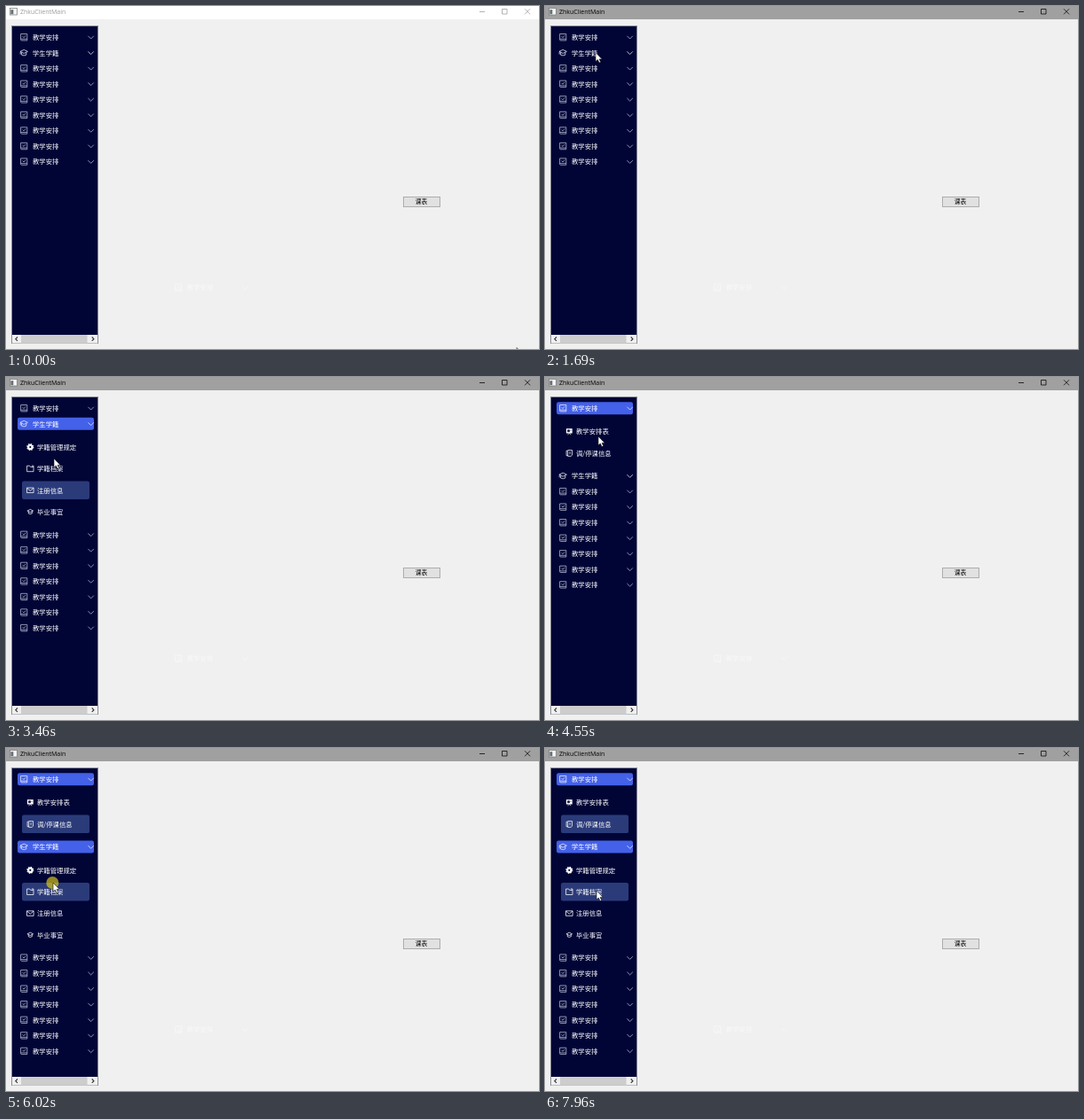
Animation of 600x387 px, one loop 8 s. Source, as an HTML page:

```html
<!DOCTYPE html>
<html lang="zh-CN">
<head>
<meta charset="utf-8">
<title>Sidebar menu</title>
<style>
  html, body { margin: 0; width: 100%; height: 100%; overflow: hidden; background: #f0f0f0; }
  svg { display: block; width: 600px; height: 387px; }
  text { font: 7.35px "Noto Sans CJK SC", "Noto Sans CJK", sans-serif; }
  .title { font: 7px "Open Sans", "Noto Sans", sans-serif; }
  .line { fill: none; stroke: currentColor; stroke-width: .75; }
</style>
</head>
<body>
<svg viewBox="0 0 600 387">
  <rect width="600" height="387" fill="#f0f0f0"/>
  <g id="bar">
    <rect id="barFill" width="600" height="15"/>
    <rect x="4.5" y="2.5" width="8" height="7.5" fill="#f4f4f4" stroke="#777" stroke-width=".7"/>
    <rect x="5.3" y="4.2" width="3" height="5" fill="#66707a"/>
    <text class="title" x="16" y="9.3" fill="currentColor">ZhkuClientMain</text>
    <path class="line" d="M533 6.5h6M558.5 3.5h5.5v5.5h-5.5zM584 3.3l6 6m0-6l-6 6"/>
  </g>
  <rect x="6.5" y="22.5" width="97" height="358" fill="#000536" stroke="#8a8e9a"/>
  <g id="menu"></g>
  <rect x="7" y="371" width="96" height="9.5" fill="#f0f0f0"/>
  <rect x="17" y="371" width="74.5" height="9.5" fill="#cdcdcd"/>
  <path d="M13 373.5l-2.2 2.2 2.2 2.2M96.7 373.5l2.2 2.2-2.2 2.2" fill="none" stroke="#333" stroke-width="1.1"/>
  <rect x="447.5" y="215.5" width="41" height="11" fill="#e1e1e1" stroke="#adadad"/>
  <text x="467.5" y="223.4" text-anchor="middle" style="font-size:6.8px">课表</text>
  <g id="ghost" color="#f8f8f8"></g>
  <circle id="press" r="7" fill="#f0dc14" fill-opacity=".62"/>
  <path id="cursor" d="M0 0V10L2.3 8 4 11.6 5.7 10.8 4.1 7.4H7.2Z" fill="#fff" stroke="#111" stroke-width=".6"/>
</svg>
<script>
const LOOP = 8000, ROW = 17.55, SUB = 24.35, PAD = 10.1;
const $ = id => document.getElementById(id);

// icons are centred on 0,0
const line = d => `<path class="line" d="${d}"/>`;
const icons = {
  book: line('M-3.5 -3.7H3.6V3.7H-2.6Q-3.6 3.7 -3.6 2.7V-3.7M-3.5 2H3.6M-1.6 -1L-.2 .4 2 -2'),
  cap: line('M-4.2 -1.4L0 -3.4 4.2 -1.4 0 .7ZM-2.6 -.5V2.4Q0 4 2.6 2.4V-.5M-4 -1.2V1.8'),
  smallCap: line('M-3.3 -1.1L0 -2.7 3.3 -1.1 0 .6ZM-2 -.4V1.9Q0 3.1 2 1.9V-.4'),
  gear: '<circle r="2.2" fill="none" stroke="currentColor" stroke-width="2.2"/>' +
    '<circle r="3.5" fill="none" stroke="currentColor" stroke-width="1.1" stroke-dasharray="1.45 1.3"/>',
  folder: line('M-3.7 -3.2H-.6L.4 -1.8H3.7V3.3H-3.7ZM1.5 -3.2H3.7V-1.8'),
  mail: line('M-3.8 -2.7H3.8V2.8H-3.8ZM-3.8 -2.5L0 .6 3.8 -2.5'),
  board: '<path d="M-3.4 -3.3H3.4V2H-3.4Z" fill="currentColor"/>' +
    '<path d="M-1.8 -1.7H.2V.3H-1.8ZM1 -1.2H2.3" fill="#000536" stroke="#000536" stroke-width=".6"/>' +
    line('M-1.8 3.4L0 2 1.8 3.4'),
  cards: line('M-2.2 -2.6H-3.2V2.8H-1.4M-1.6 -3.3H3.2V2.3L1.8 3.5H-1.6ZM.8 -1.8V1.4')
};

const groups = Array.from({ length: 9 }, () => ({ name: '教学安排', icon: 'book', items: [] }));
groups[0].items = [['教学安排表', 'board'], ['调/停课信息', 'cards']];
groups[1] = { name: '学生学籍', icon: 'cap', items: [
  ['学籍管理规定', 'gear'], ['学籍档案', 'folder'], ['注册信息', 'mail'], ['毕业事宜', 'smallCap']
] };

// bursts of picture updates: start, end, count
const bursts = [
  [70, 840, 11], [1300, 1760, 7], [1930, 2150, 4], [2300, 3080, 11], [3230, 3920, 10], [4090, 4860, 11],
  [4940, 5720, 11], [5870, 6640, 11], [6710, 6800, 2], [6950, 7640, 10], [7810, 7960, 3]
];

// press, release, group, item (-1 toggles the group)
const clicks = [
  [1760, 1900, 1, -1], [2077, 2200, 1, 0], [2534, 2690, 1, 1], [2924, 3080, 1, 2],
  [3767, 3920, 1, -1], [4167, 4321, 0, -1], [4783, 4940, 0, 1], [5252, 5408, 1, -1],
  [5642, 5800, 1, 0], [5947, 6100, 1, 1], [6332, 6486, 1, 2], [6710, 6795, 1, 3],
  [7103, 7257, 1, 2], [7333, 7487, 1, 1], [7563, 7640, 1, 0], [7885, 7955, 1, 1]
];
const FOCUS = 610;

// pointer path: time, x, y
const path = [
  [0, 575, 385.5], [300, 430, 285], [610, 150, 105], [840, 62, 27], [1223, 62, 27], [1683, 57, 52.5],
  [1860, 57, 52.5], [2077, 57, 77], [2225, 57, 77], [2534, 58, 104], [2612, 58, 104], [2924, 56, 138],
  [3153, 56, 138], [3460, 54, 92], [3690, 57, 53], [3843, 57, 53], [3920, 57, 49], [4013, 57, 49],
  [4167, 58, 36], [4321, 58, 36], [4552, 60, 67], [4783, 56, 78], [4940, 56, 78], [5252, 56, 112],
  [5408, 56, 112], [5642, 54, 137], [5793, 54, 137], [5947, 53, 152], [6101, 53, 152], [6332, 52, 184],
  [6409, 52, 184], [6563, 50, 202], [6873, 50, 202], [7103, 52, 186], [7180, 52, 186], [7333, 54, 165],
  [7410, 54, 165], [7563, 56, 142], [7735, 56, 142], [7885, 57, 157], [7960, 58, 161]
];

const at = (x, y, body) => `<g transform="translate(${x} ${y})">${body}</g>`;
const label = (x, y, s) => `<text x="${x}" y="${y + 2.75}" fill="currentColor">${s}</text>`;
const box = (x, y, w, h, fill) =>
  `<rect x="${x}" y="${y - h / 2}" width="${w}" height="${h}" rx="2.2" fill="${fill}"/>`;
const tint = (c, body) => `<g color="${c}">${body}</g>`;

function header(x, y, name, icon, iconColor) {
  const chevron = line('M-3.2 -1.6L0 1.6 3.2 -1.6');
  return tint(iconColor, at(x + 20.2, y, icons[icon]) + at(x + 95.6, y + .2, chevron)) + label(x + 30, y, name);
}

function menuMarkup(state) {
  let y = 35.2, out = '';
  groups.forEach((g, i) => {
    const { open, picked } = state[i] || {};
    if (open) out += box(13, y, 86, 14, '#4461e9');
    out += header(0, y, g.name, g.icon, i === 1 || open ? '#eef0ff' : '#bcc1d6');
    if (open) {
      g.items.forEach(([name, icon], k) => {
        const cy = y + 26.3 + k * SUB;
        if (k === picked) out += box(18, cy, 76, 20.5, '#2b3b7a');
        out += at(27.3, cy, icons[icon]) + label(35, cy, name);
      });
      y += PAD + SUB * g.items.length;
    }
    y += ROW;
  });
  return tint('#fff', out);
}

function stepTime(t) {
  let s = 0;
  for (const [start, end, n] of bursts) {
    if (t + 6 < start) break;
    const dt = (end - start) / (n - 1);
    s = start + dt * Math.min(n - 1, Math.floor((t + 6 - start) / dt));
  }
  return s;
}

function pointer(s) {
  const i = path.findIndex(p => p[0] >= s);
  if (i < 1) return path[i < 0 ? path.length - 1 : 0].slice(1);
  const [t0, x0, y0] = path[i - 1], [t1, x1, y1] = path[i];
  const k = (s - t0) / (t1 - t0);
  return [x0 + (x1 - x0) * k, y0 + (y1 - y0) * k];
}

function draw(s) {
  const now = s + 3, state = [{}, {}];
  let down = now >= FOCUS && now < FOCUS + 80;
  for (const [press, release, g, item] of clicks) {
    if (now < press) break;
    if (item < 0) state[g].open = !state[g].open;
    else state[g].picked = item;
    if (now < release) down = true;
  }
  const active = now >= FOCUS;
  $('barFill').setAttribute('fill', active ? '#a0a0a0' : '#fff');
  $('bar').setAttribute('color', active ? '#000' : '#999');
  $('menu').innerHTML = menuMarkup(state);
  const [x, y] = pointer(s);
  $('cursor').setAttribute('transform', `translate(${x} ${y})`);
  $('press').setAttribute('transform', `translate(${x - .7} ${y})`);
  $('press').style.display = down ? '' : 'none';
}

$('ghost').innerHTML = header(173.7, 317.7, '教学安排', 'book', '#f8f8f8');
const begin = performance.now();
let last = -1;
function tick() {
  const s = stepTime((performance.now() - begin) % LOOP);
  if (s !== last) draw(last = s);
  requestAnimationFrame(tick);
}
tick();
</script>
</body>
</html>
```
